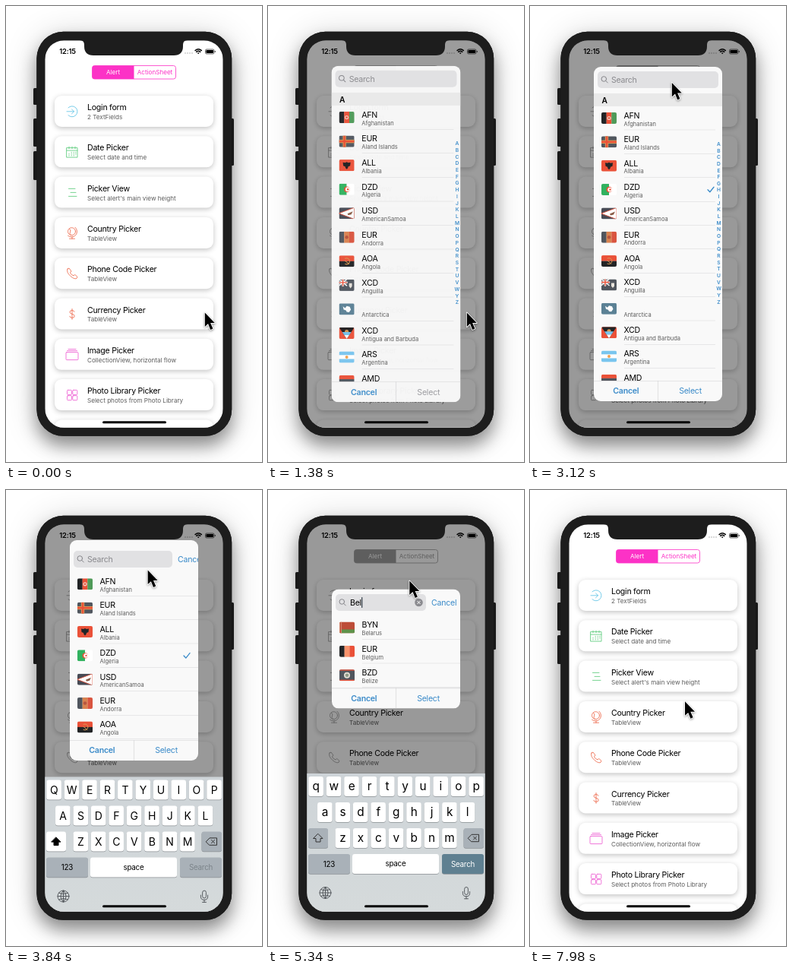
An HTML page with a canvas that plays this animation: 337x600 px, repeating every 8.28 s.

```html
<!DOCTYPE html>
<html lang="en">
<head>
<meta charset="utf-8">
<title>Country picker demo</title>
<style>
html, body { margin: 0; width: 100%; height: 100%; overflow: hidden; background: #fff; }
canvas { display: block; width: 337px; height: 600px; }
</style>
</head>
<body>
<canvas id="stage"></canvas>
<script>
const LOOP = 8280, TICK = 60;
const ROW = 31.35;
const SCREEN = [51.3, 45.3, 234.4, 509.5];
const BODY = [40.4, 33.8, 256.8, 532];
const BLUE = '#3b8bc9', PINK = '#fc32c6', GRAY = '#9c9c9c', BEZEL = '#1d1d1d';
const canvas = document.getElementById('stage');
const ctx = canvas.getContext('2d');
const ratio = window.devicePixelRatio || 1;
canvas.width = 337 * ratio;
canvas.height = 600 * ratio;

// ---------- timing ----------
const ease = p => p * p * (3 - 2 * p);

// Value of the last key reached: hard changes.
const hold = (t, keys) => keys.filter(k => k[0] <= t).pop()[1];

// Interpolated value, column `col`, of keys [time, value, ...].
function track(t, keys, curve = p => p, col = 1) {
  const i = keys.findIndex(k => k[0] > t);
  if (i < 0) return keys[keys.length - 1][col];
  if (i === 0) return keys[0][col];
  const a = keys[i - 1], b = keys[i];
  return a[col] + (b[col] - a[col]) * curve((t - a[0]) / (b[0] - a[0]));
}

const alertKeys = [[0, 0], [1260, .45], [1380, .97], [1560, 1], [7380, .4], [7500, 0]];
const keyboardKeys = [[0, 0], [3660, .05], [3840, .975], [4020, 1], [7860, .45], [7980, 0]];
const typedKeys = [[0, ''], [4860, 'B'], [5040, 'Be'], [5220, 'Bel']];
const rowKeys = [[5040, 7], [5160, 5], [5220, 5], [5340, 3]];
const caretKeys = [[3960, 0], [4020, 1], [4140, 1], [4320, 0], [4500, 0], [4620, 1], [5640, 1], [5820, 0],
  [6000, 0], [6120, 1], [6480, 1], [6660, 0], [6840, 0], [6960, 1], [7080, 1], [7140, 0]];
const cursorKeys = [[1740, 261.8, 403.5], [2400, 209.8, 248.5], [2700, 209.8, 248.5], [3120, 186.8, 101],
  [5340, 186.3, 119.5], [5640, 190, 184], [6000, 190, 184], [6420, 204, 287], [6660, 204, 278.3]];

// ---------- drawing helpers ----------
function box(x, y, w, h, r, fill, stroke, lineWidth = 1) {
  ctx.beginPath();
  ctx.roundRect(x, y, w, h, r);
  if (fill) { ctx.fillStyle = fill; ctx.fill(); }
  if (stroke) { ctx.strokeStyle = stroke; ctx.lineWidth = lineWidth; ctx.stroke(); }
}

function disc(x, y, r, fill) {
  ctx.beginPath();
  ctx.arc(x, y, r, 0, 7);
  ctx.fillStyle = fill;
  ctx.fill();
}

function shape(path, fill, stroke, lineWidth = .8, x = 0, y = 0) {
  ctx.save();
  ctx.translate(x, y);
  ctx.lineCap = ctx.lineJoin = 'round';
  const p = new Path2D(path);
  if (fill) { ctx.fillStyle = fill; ctx.fill(p); }
  if (stroke) { ctx.strokeStyle = stroke; ctx.lineWidth = lineWidth; ctx.stroke(p); }
  ctx.restore();
}

// y is the middle of the capitals
function text(str, x, y, size, color = '#000', align = 'left', weight = 400) {
  ctx.font = `${weight} ${size}px Inter, Roboto, sans-serif`;
  ctx.letterSpacing = size > 9 ? -.024 * size + 'px' : '0px';
  ctx.textAlign = align;
  ctx.fillStyle = color;
  ctx.fillText(str, x, y + size * .36);
}

function shadow(color, blur, dy) {
  ctx.shadowColor = color;
  ctx.shadowBlur = blur * ratio;
  ctx.shadowOffsetY = dy * ratio;
}

function clipBox(x, y, w, h, r) {
  ctx.beginPath();
  ctx.roundRect(x, y, w, h, r);
  ctx.clip();
}

// ---------- phone ----------
function drawBody() {
  for (const [x, y, h] of [[36, 108, 22], [36, 148, 37], [36, 191, 38], [294, 148, 62]])
    box(x, y, 6, h, 1.5, '#222');
  ctx.save();
  shadow('rgba(0,0,0,.16)', 45, 4);
  box(...BODY, 35, BEZEL);
  shadow('rgba(0,0,0,.4)', 22, 13);
  box(...BODY, 35, BEZEL);
  ctx.restore();
}

function drawNotch() {
  shape('M97 44H239V45Q233 45 233 51V53Q233 65 221 65H115Q103 65 103 53V51Q103 45 97 45Z', BEZEL);
}

function drawStatus() {
  text('12:15', 81, 60, 9.4, '#000', 'center', 600);
  for (let i = 0; i < 4; i++) disc(236 + i * 3, 62, .8, '#aaa');
  shape('M249 58.6Q253.2 55 257.4 58.6M250.6 60.4Q253.2 58.2 255.8 60.4', null, '#000', 1.4);
  shape('M251.8 61.8Q253.2 60.6 254.6 61.8L253.2 63.2Z', '#000');
  box(262.5, 57, 11.5, 6, 1.6, null, '#000', .6);
  box(263.4, 57.9, 9.7, 4.2, 1, '#000');
  box(274.8, 59, .8, 2, .4, '#000');
}

// ---------- main list ----------
const cards = [
  ['Login form', '2 TextFields', '#5fc3e6', 'M-5-5A7 7 0 1 1-5 5M-7 0H2.5M-.5-3L2.5 0L-.5 3'],
  ['Date Picker', 'Select date and time', '#5fcd7e',
    'M-7-5.5H7V7H-7ZM-7-2H7M-4-7V-4.5M0-7V-4.5M4-7V-4.5M-1 .5h.6M2 .5h.6M4.5 .5h.6M-4.3 2.6h.6M-1 2.6h.6M2 2.6h.6M4.5 2.6h.6M-4.3 4.7h.6M-1 4.7h.6M2 4.7h.6'],
  ['Picker View', "Select alert's main view height", '#5fcd7e', 'M-4.5-5H4M-2 0H5M-4.5 5H6'],
  ['Country Picker', 'TableView', '#ee6a4c',
    'M4.5-2A5 5 0 1 1-5.5-2A5 5 0 1 1 4.5-2M-3.5-5.5Q-1-4-2.5-1.5T-1.5 2.5M4-7.5A7.2 7.2 0 0 1-5.5 3.5M0 5V7.5M-3.5 7.5H3.5'],
  ['Phone Code Picker', 'TableView', '#ee6a4c',
    'M-6-6L-4-7L-1-3L-2.6-1Q-1 2 2 3L3.6 1.4L7 4.4L6 6.4Q3 8-2 3.5Q-8-2-6-6Z'],
  ['Currency Picker', 'TableView', '#ee6a4c',
    'M3-3Q2.4-4.8 0-4.8Q-3-4.8-3-2.5Q-3-.6 0 0Q3.2 .6 3.2 2.7Q3.2 5 0 5Q-2.8 5-3.2 3M0-6.8V7'],
  ['Image Picker', 'CollectionView, horizontal flow', '#ee5fd2',
    'M-5-7H5M-6.5-5H6.5M-7-3H7Q8-3 8-2V6Q8 7 7 7H-7Q-8 7-8 6V-2Q-8-3-7-3Z'],
  ['Photo Library Picker', 'Select photos from Photo Library', '#ee5fd2',
    [[-6.5, -6.5], [.8, -6.5], [-6.5, .8], [.8, .8]].map(([x, y]) =>
      `M${x + 1} ${y}h4q1 0 1 1v4q0 1-1 1h-4q-1 0-1-1v-4q0-1 1-1Z`).join('')],
  ['', '', '#fff', '']
];

function drawList(dimmed) {
  box(...SCREEN, 0, '#fff');
  const tint = dimmed ? GRAY : PINK;
  box(113.5, 78.5, 110, 17.5, 3, '#fff', tint, .8);
  box(113.5, 78.5, 55, 17.5, [3, 0, 0, 3], tint);
  text('Alert', 141, 87, 8.1, '#fff', 'center');
  text('ActionSheet', 196, 87, 8.1, tint, 'center');
  cards.forEach(([title, detail, color, icon], i) => {
    const y = 118 + i * 53.3;
    ctx.save();
    shadow('rgba(0,0,0,.24)', 7, 2);
    box(64, y, 209, 41, 9, '#fff');
    ctx.restore();
    shape(icon, null, dimmed ? GRAY : color, .85, 87, y + 20.8);
    text(title, 107, y + 15.3, 10.6);
    text(detail, 107, y + 28, 8.1, '#5c5c5c');
  });
  drawStatus();
}

// ---------- flags, 20 x 15 ----------
const RED = '#ea5138', INK = '#222426', SLATE = '#50565e', GREEN = '#4f9a58', SKY = '#79c5ee', GOLD = '#d99a55';
const fill = (c, x = 0, y = 0, w = 20, h = 15) => { ctx.fillStyle = c; ctx.fillRect(x, y, w, h); };
const columns = (...cs) => cs.forEach((c, i) => fill(c, i * 20 / cs.length, 0, 20 / cs.length + .1));
const bands = (...cs) => cs.forEach((c, i) => fill(c, 0, i * 15 / cs.length, 20, 15 / cs.length + .1));
const cross = (c, w) => { fill(c, 7 - w / 2, 0, w); fill(c, 0, 7.5 - w / 2, 20, w); };

const flags = {
  Afghanistan() { columns(INK, RED, GREEN); disc(10, 7.5, 2.6, '#f3c9bc'); disc(10, 7.5, 1.3, RED); },
  'Aland Islands'() { fill(SLATE); cross(GOLD, 4.4); cross(RED, 2.4); },
  Albania() { fill(RED); shape('M10 3L12 4L15 3.5L14.5 8L12 9L11.5 11L10 12.5L8.5 11L8 9L5.5 8L5 3.5L8 4Z', INK); },
  Algeria() { columns('#31b25f', '#fff'); disc(10.2, 7.5, 3.7, RED); disc(11.2, 7.5, 2.9, '#fff'); disc(11.5, 7.5, 1.2, RED); },
  AmericanSamoa() { fill('#474b55'); shape('M0 7.5L20 0V15Z', '#fff', RED, .8); shape('M11 8L18 5L16 9L12 10Z', '#8a5a44'); },
  Andorra() { columns(SLATE, '#d98350', '#d9553f'); disc(10, 7.5, 2.2, '#b8563f'); },
  Angola() { bands(RED, INK); shape('M8 4A4 4 0 1 1 8 11M8 7L13 11', null, GOLD, 1); },
  Anguilla() {
    fill(SLATE);
    shape('M0 0L10 8M10 0L0 8', null, '#fff', 1.4);
    shape('M5 0V8M0 4H10', null, '#fff', 2.6);
    shape('M5 0V8M0 4H10', null, RED, 1.4);
    shape('M13 5H17V9L15 11.5L13 9Z', '#e8e4dc');
  },
  Antarctica() { fill('#5b8195'); shape('M5 4L8 6L10 3.5L14 4.5L15.5 8L13 11.5L10 11L9 9L6 8Z', '#fff'); },
  'Antigua and Barbuda'() {
    fill(RED);
    shape('M0 0H20L10 15Z', INK);
    disc(10, 5.8, 2.6, GOLD);
    shape('M4 6H16L13.3 10H6.7Z', SKY);
    shape('M6.7 10H13.3L10 15Z', '#fff');
  },
  Argentina() { bands(SKY, '#fff', SKY); disc(10, 7.5, 2, '#f0a04c'); },
  Armenia() { bands(RED, SLATE, GOLD); },
  Bahamas() { bands(SKY, GOLD, SKY); shape('M0 0L9 7.5L0 15Z', INK); },
  Bahrain() { fill(RED); shape('M0 0H6L9 2L6 4L9 6L6 8L9 10L6 12L9 15H0Z', '#fff'); },
  Bangladesh() { fill(GREEN); disc(9, 7.5, 4, RED); },
  Barbados() { columns(SLATE, GOLD, SLATE); shape('M10 4V11M8 5V8H12V5', null, INK, 1); },
  Belarus() { fill('#bd4d38'); fill('#5f924a', 0, 10, 20, 5); fill('#d98f78', 0, 0, 3); shape('M1.5 1V14', null, '#bd4d38', 1.3); },
  Belgium() { columns(INK, '#f7936c', RED); },
  Belize() { fill(SLATE); fill(RED, 0, 0, 20, 1.5); fill(RED, 0, 13.5, 20, 1.5); disc(10, 7.5, 4, '#e4dfd6'); disc(10, 7.5, 2.3, '#8d9a86'); },
  Benin() { bands(GOLD, RED); fill(GREEN, 0, 0, 8); },
  Bermuda() { fill(RED); fill(SLATE, 0, 0, 9, 7); shape('M4.5 0V7M0 3.5H9', null, '#fff', 1.6); fill('#fff', 13, 5, 4, 6); }
};

const names = Object.keys(flags);
const codes = 'AFN EUR ALL DZD USD EUR AOA XCD  XCD ARS AMD BSD BHD BDT BBD BYN EUR BZD XOF BMD'.split(' ');

function drawFlag(name, x, y) {
  ctx.save();
  ctx.translate(x, y);
  clipBox(0, 0, 20, 15, 2);
  flags[name]();
  ctx.restore();
}

// ---------- alert ----------
function alertLayout(t, typed) {
  if (typed) {
    const height = 63 + ROW * track(t, rowKeys, ease), top = 209 - height / 2;
    return { top, bottom: top + height, search: top + 17.5, first: top + 35, fieldEnd: 208, cancel: 215 };
  }
  if (t >= 4020) return { top: 65, bottom: 354, search: 90, first: 107.5, fieldEnd: 208, cancel: 215 };
  if (t >= 3840) return { top: 66, bottom: 356, search: 91, first: 108.3, fieldEnd: 219, cancel: 226 };
  return { top: 80, bottom: 520, search: 97, first: 132, fieldEnd: 248, cancel: 0 };
}

function drawSearch(t, typed, { search: y, fieldEnd, cancel }) {
  box(89, y - 11, fieldEnd - 89, 22, 5, '#e1e1e3');
  shape('M3.3 0A3.3 3.3 0 1 1-3.3 0A3.3 3.3 0 1 1 3.3 0M2.4 2.4L5 5', null, '#85858a', 1, 97.3, y - 1);
  text(typed || 'Search', typed ? 108 : 107, y, 10.6, typed ? '#000' : '#8a8a8e');
  if (!cancel) return;
  const end = typed ? ctx.measureText(typed).width : 0;
  ctx.globalAlpha *= track(t, caretKeys);
  box(108.2 + end, y - 7, 1.2, 14, .5, '#333d48');
  ctx.globalAlpha = hold(t, alertKeys);
  text('Cancel', cancel, y, 10.6, BLUE);
  if (typed) {
    disc(198.5, y, 5.3, '#8b8b90');
    shape('M-1.8-1.8L1.8 1.8M1.8-1.8L-1.8 1.8', null, '#fff', 1, 198.5, y);
  }
}

function drawAlert(t) {
  const shown = hold(t, alertKeys);
  if (!shown) return;
  const typed = hold(t, typedKeys);
  const layout = alertLayout(t, typed);
  const { top, bottom, first, cancel } = layout;
  const footer = bottom - 27;
  const list = names.filter(n => n.startsWith(typed || 'A'));
  const picked = t >= 5880 ? 'Belarus' : t >= 2520 ? 'Algeria' : '';
  const selectColor = !picked ? '#9b9b9f' : t >= 6840 ? '#74add8' : BLUE;

  ctx.save();
  ctx.globalAlpha = shown;
  if (t < 2000) {
    const s = 1 + .2 * (1 - shown);
    ctx.translate(168.5, 300);
    ctx.scale(s, s);
    ctx.translate(-168.5, -300);
  }
  clipBox(84, top, 169, bottom - top, 9);
  box(84, top, 169, bottom - top, 0, '#f9f9f9');
  drawSearch(t, typed, layout);

  ctx.save();
  clipBox(84, first - 17, 169, footer - first + 17, 0);
  if (!cancel) {
    box(84, first - 17, 169, 17, 0, '#e9e9e9');
    text('A', 94.5, first - 8, 10.2, '#000', 'left', 600);
  }
  list.forEach((name, i) => {
    const y = first + i * ROW;
    drawFlag(name, 94, y + 8);
    text(codes[names.indexOf(name)], 123.5, y + 12, 10.6);
    text(name, 123.5, y + 23, 7.5, '#5c5c5c');
    box(124, y + ROW - .5, cancel ? 129 : 120, .5, 0, '#d5d5d7');
    if (name === picked) shape('M-4 0L-1.2 3L4-3.5', null, BLUE, 1.3, 238, y + 15.7);
  });
  if (!cancel) [...'ABCDEFGHIJKLMNOPQRSTUVWYZ'].forEach((c, i) =>
    text(c, 248.5, 181.5 + i * 8.66, 6.6, BLUE, 'center', 600));
  ctx.restore();

  box(84, footer, 169, .6, 0, '#d0d0d2');
  box(168.3, footer, .6, 27, 0, '#d0d0d2');
  text('Cancel', 126.3, bottom - 13.5, 10.6, BLUE, 'center', 600);
  text('Select', 211, bottom - 13.5, 10.6, selectColor, 'center');
  ctx.restore();
}

// ---------- keyboard ----------
function key(x, y, w, color = '#fff') {
  box(x, y + .7, w, 26, 3, '#8b9094');
  box(x, y, w, 26, 3, color);
}

function drawKeyboard(t) {
  const shown = hold(t, keyboardKeys);
  if (!shown) return;
  const lower = t >= 4860, dark = '#a9b1b8', ink = '#333';
  ctx.save();
  ctx.translate(0, 556 - 183 * shown);
  const back = ctx.createLinearGradient(0, 0, 0, 183);
  back.addColorStop(0, '#ced4d8');
  back.addColorStop(1, '#d5dadb');
  box(51, 0, 236, 190, 0, back);

  ['QWERTYUIOP', 'ASDFGHJKL', 'ZXCVBNM'].forEach((letters, row) => {
    const y = 4 + row * 34, start = 168.6 - (letters.length - 1) * 11.72;
    [...letters].forEach((c, i) => {
      const x = start + i * 23.44;
      key(x - 9.8, y, 19.6);
      text(lower ? c.toLowerCase() : c, x, y + (lower ? 12.2 : 13), lower ? 15.4 : 14, '#000', 'center');
    });
  });

  key(53, 72, 26, lower ? dark : '#fff');
  shape('M0-5.5L6 .5H3V5H-3V.5H-6Z', lower ? null : '#000', lower ? ink : '#000', 1, 66, 85);
  key(257.5, 72, 26.5, dark);
  shape('M-7 0L-2.5-4.7H7V4.7H-2.5ZM0-2L4 2M4-2L0 2', null, ink, 1, 270.5, 85);

  key(53, 106, 55, dark);
  text('123', 80.5, 119, 9.8, '#000', 'center');
  key(111, 106, 114);
  text('space', 168, 118.5, 9.8, '#000', 'center');
  const action = !lower ? dark : t >= 7380 ? '#1580f0' : '#5f8091';
  key(229, 106, 55, action);
  text('Search', 256.5, 119, 9.8, lower ? '#fff' : '#7c848a', 'center');

  shape('M7.5 0A7.5 7.5 0 1 1-7.5 0A7.5 7.5 0 1 1 7.5 0M-7.5 0H7.5M0-7.5V7.5M0-7.5Q-7.5 0 0 7.5M0-7.5Q7.5 0 0 7.5M-6-4.3Q0-1.5 6-4.3M-6 4.3Q0 1.5 6 4.3',
    null, '#4b5054', .9, 75.5, 157);
  shape('M-2.4-5Q-2.4-7.5 0-7.5Q2.4-7.5 2.4-5V0Q2.4 2.5 0 2.5Q-2.4 2.5-2.4 0ZM-4.6-1.5V.5Q-4.6 4.8 0 4.8Q4.6 4.8 4.6 .5V-1.5M0 4.8V7.8M-2.5 7.8H2.5',
    null, '#4b5054', .9, 261, 157);
  ctx.restore();
}

function drawCursor(t) {
  const arrow = 'M0 0V18.5L4.2 14.6L7.4 22.4L10.6 21L7.3 13.5H13Z';
  const x = track(t, cursorKeys, ease, 1), y = track(t, cursorKeys, ease, 2);
  ctx.save();
  shadow('rgba(0,0,0,.3)', 3, 1);
  shape(arrow, '#fff', '#fff', 1.8, x, y);
  ctx.restore();
  shape(arrow, '#000', null, 0, x, y);
}

function draw(t) {
  ctx.setTransform(ratio, 0, 0, ratio, 0, 0);
  box(0, 0, 337, 600, 0, '#fff');
  drawBody();
  ctx.save();
  clipBox(...SCREEN, 25);
  const dim = hold(t, alertKeys);
  drawList(dim > .42);
  box(...SCREEN, 0, `rgba(0,0,0,${.4 * dim})`);
  drawAlert(t);
  drawKeyboard(t);
  box(127, 546.3, 84, 3, 1.5, '#000');
  ctx.restore();
  drawNotch();
  drawCursor(t);
}

const start = performance.now();
function frame() {
  const t = (performance.now() - start) % LOOP;
  draw(Math.floor(t / TICK) * TICK);
  requestAnimationFrame(frame);
}
frame();
</script>
</body>
</html>
```
